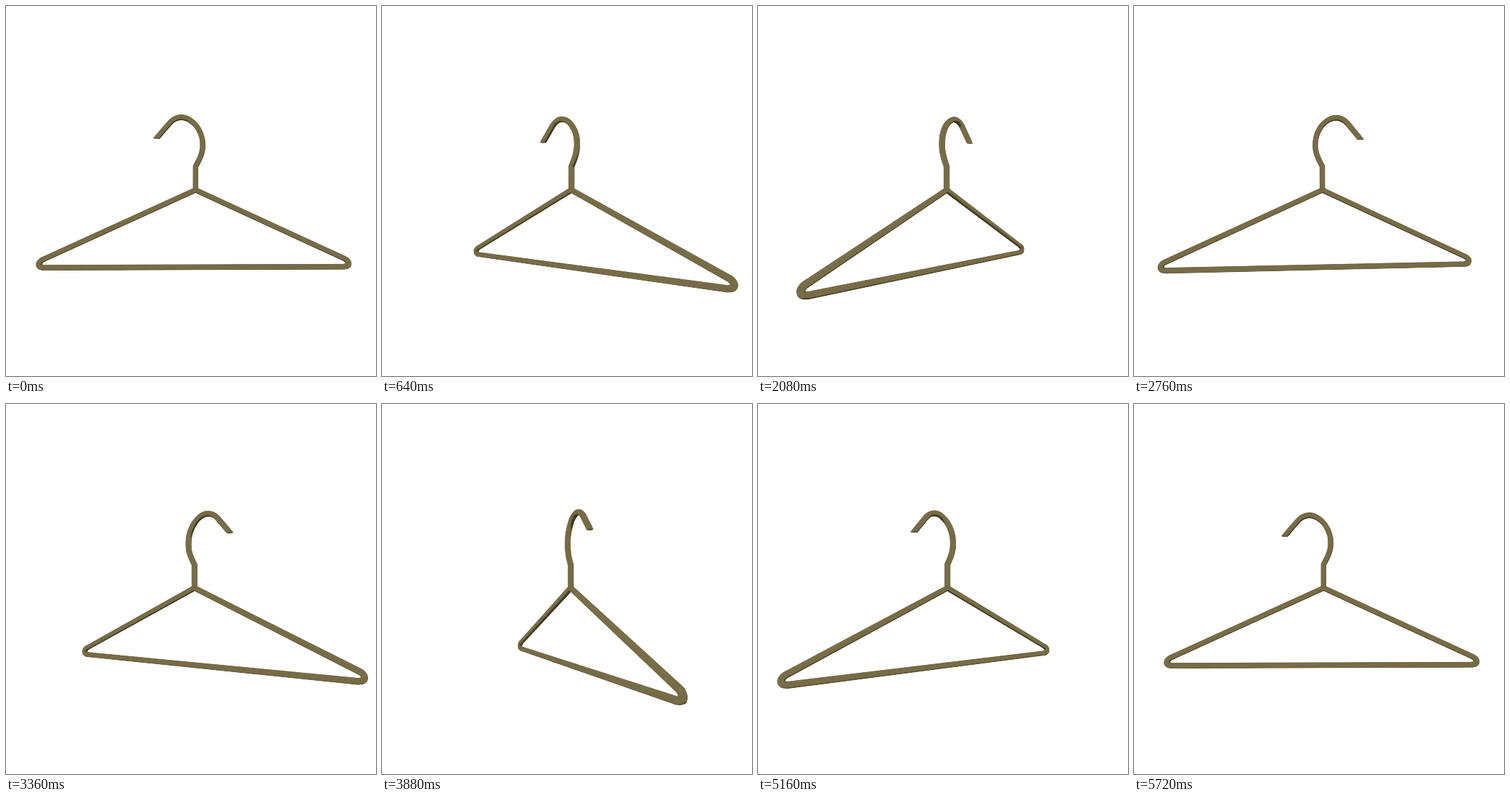
These frames come from a looping animation (512 by 512 pixels, 5760 ms). An HTML page with a canvas:

```html
<!DOCTYPE html>
<html lang="en">
<head>
<meta charset="utf-8">
<title>Turning hanger</title>
<style>
html, body { margin: 0; width: 100%; height: 100%; overflow: hidden; background: #fff; }
canvas { display: block; width: 512px; height: 512px; }
</style>
</head>
<body>
<canvas id="stage" width="512" height="512"></canvas>
<script>
const ctx = document.getElementById('stage').getContext('2d');
const FRAMES = 144, STEP = 40, START = -1.1 * Math.PI / 180;
const AXIS = 261.5, HORIZON = 275, CAMERA = 510;
const HALF = 3.25, SIDES = 16;
const DARK = [60, 53, 29], LIGHT = [116, 105, 67];

// Centre lines of the wire, seen from the front
const apex = [262.3, 254.6];
const hookPoints = [[262.4, 222], [269, 208.5], [272, 196], [270.6, 180], [263.5, 166],
  [253, 157], [242, 154.2], [231, 158], [220.5, 169], [208.6, 183]];
const endPoints = [[468, 349.2], [473, 351.8], [475.5, 356], [474.2, 360], [469, 361.4]];

function spline(points, parts) {
  const at = i => points[Math.max(0, Math.min(points.length - 1, i))];
  const out = [];
  for (let i = 0; i < points.length - 1; i++) {
    const [a, b, c, d] = [at(i - 1), at(i), at(i + 1), at(i + 2)];
    for (let k = 0; k < parts; k++) {
      const t = k / parts;
      out.push([0, 1].map(n => b[n] + t / 2 * (c[n] - a[n]
        + t * (2 * a[n] - 5 * b[n] + 4 * c[n] - d[n])
        + t * t * (3 * b[n] - a[n] - 3 * c[n] + d[n]))));
    }
  }
  return [...out, points[points.length - 1]];
}

function subdivide(points, closed) {
  const out = [];
  points.forEach((p, i) => {
    const q = points[i + 1] || (closed ? points[0] : null);
    if (!q) return out.push(p);
    const n = Math.ceil(Math.hypot(q[0] - p[0], q[1] - p[1]) / 18);
    for (let k = 0; k < n; k++) {
      out.push([p[0] + (q[0] - p[0]) * k / n, p[1] + (q[1] - p[1]) * k / n]);
    }
  });
  return out;
}

function normal(p, q) {
  const dx = q[0] - p[0], dy = q[1] - p[1], len = Math.hypot(dx, dy);
  return [-dy / len, dx / len];
}

// Cross-section of the wire: a square with rounded corners
const soften = v => HALF * Math.sign(v) * Math.abs(v) ** 0.6;
const section = Array.from({ length: SIDES }, (_, j) => {
  const angle = j / SIDES * 2 * Math.PI;
  return [soften(Math.cos(angle)), soften(Math.sin(angle))];
});

// Each face: corner points and an outward normal
const faces = [];
function addTube(points, closed) {
  const n = points.length, count = closed ? n : n - 1;
  const normals = Array.from({ length: count }, (_, i) => normal(points[i], points[(i + 1) % n]));
  const rings = points.map((p, i) => {
    const a = normals[closed ? (i + n - 1) % n : Math.max(0, i - 1)];
    const b = normals[Math.min(i, count - 1)];
    const m = 1 + a[0] * b[0] + a[1] * b[1];
    let miter = [(a[0] + b[0]) / m, (a[1] + b[1]) / m];
    if (!closed && i === n - 1) miter = [-1.25, 0];
    return section.map(([r, z]) =>
      [p[0] + miter[0] * r - AXIS, p[1] + miter[1] * r - HORIZON, z]);
  });
  normals.forEach((m, i) => {
    const next = rings[(i + 1) % n];
    for (let j = 0; j < SIDES; j++) {
      const k = (j + 1) % SIDES;
      const [nz, nr] = normal(section[j], section[k]);
      faces.push({
        corners: [rings[i][j], rings[i][k], next[k], next[j]],
        normal: [-nz * m[0], -nz * m[1], -nr]
      });
    }
  });
  if (!closed) faces.push({ corners: rings[n - 1], normal: [0, 1, 0] });
}

const rightEnd = spline(endPoints, 3);
const leftEnd = rightEnd.map(([x, y]) => [2 * AXIS - x, y]).reverse();
addTube(subdivide([apex, ...rightEnd, ...leftEnd], true), true);
addTube(subdivide([apex, ...spline(hookPoints, 5)], false), false);

// Light comes from above and a little from the left
function shade([x, y, z]) {
  const t = Math.max(0, Math.min(1, (0.5 * z - 0.8 * y - 0.36 * x + 0.32) / 0.2));
  const s = t * t * (3 - 2 * t);
  return `rgb(${DARK.map((d, i) => Math.round(d + (LIGHT[i] - d) * s))})`;
}

function draw(angle) {
  const c = Math.cos(angle), s = Math.sin(angle);
  const turn = ([x, y, z]) => [x * c - z * s, y, x * s + z * c];
  const visible = [];
  for (const face of faces) {
    const n = turn(face.normal), pts = face.corners.map(turn), p = pts[0];
    if (n[2] * (CAMERA - p[2]) - n[0] * p[0] - n[1] * p[1] <= 0) continue;
    visible.push({ n, pts, depth: pts.reduce((sum, q) => sum + q[2], 0) / pts.length });
  }
  visible.sort((a, b) => a.depth - b.depth);

  ctx.fillStyle = '#fff';
  ctx.fillRect(0, 0, 512, 512);
  ctx.lineWidth = 0.6;
  ctx.lineJoin = 'round';
  for (const { n, pts } of visible) {
    ctx.fillStyle = ctx.strokeStyle = shade(n);
    ctx.beginPath();
    for (const [x, y, z] of pts) {
      const scale = CAMERA / (CAMERA - z);
      ctx.lineTo(AXIS + x * scale, HORIZON + y * scale);
    }
    ctx.closePath();
    ctx.fill();
    ctx.stroke();
  }
}

function tick() {
  const step = Math.floor(performance.now() / STEP) % FRAMES;
  draw(START + step / (FRAMES - 1) * 2 * Math.PI);
  requestAnimationFrame(tick);
}
tick();
</script>
</body>
</html>
```
